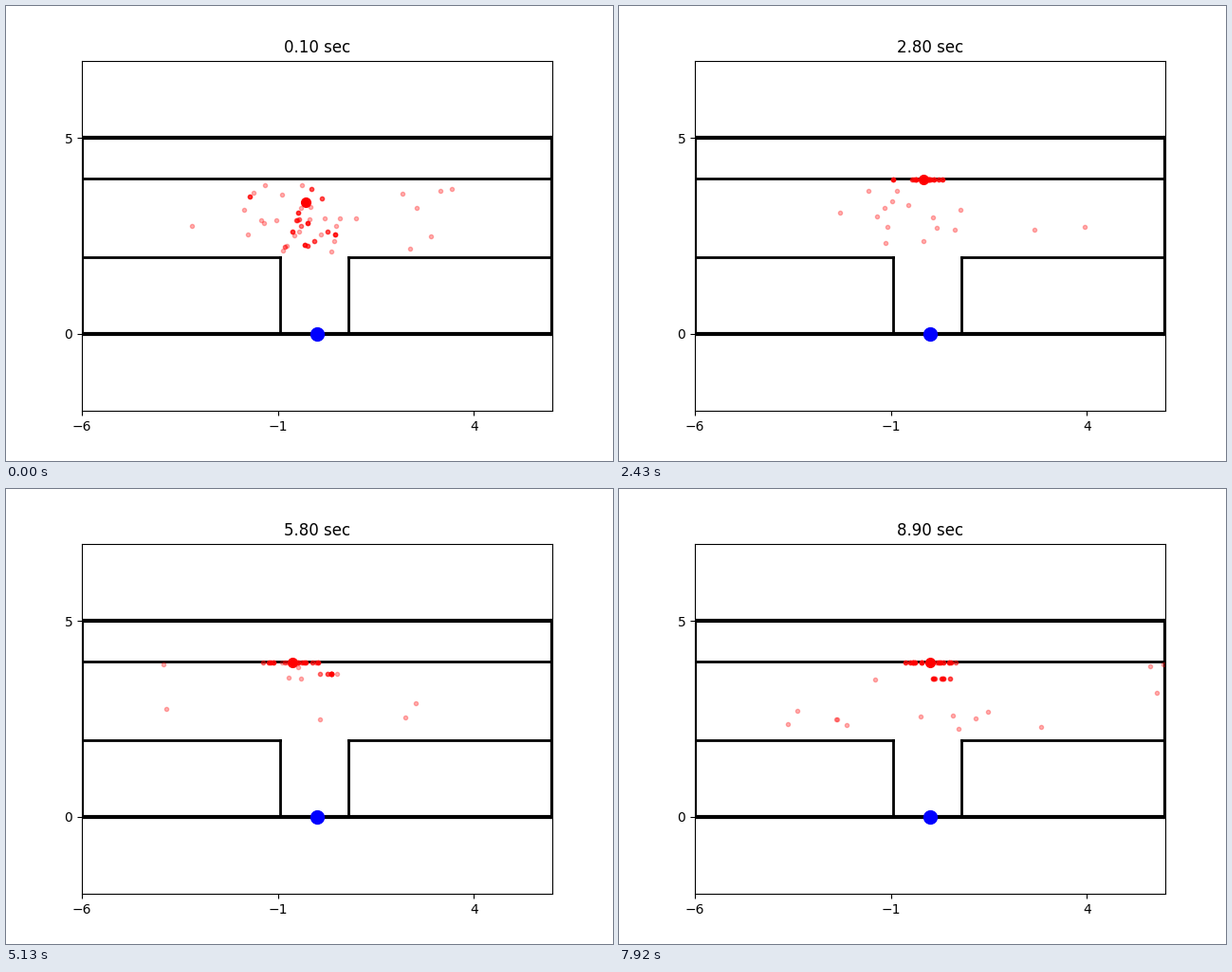
These frames come from a looping animation (640 px wide and 480 px high, 8 s). A matplotlib script:

```python
import numpy as np
import matplotlib.pyplot as plt
from matplotlib.animation import FuncAnimation

FRAMES = 89
LOOP_MS = 8000
FLOOR_Y, WALL_Y = 2.1, 3.94   # particles pile up against the upper wall
CLIMB = 0.17                  # upward drift per step
PILE = 22                     # distinct positions in the main pile
GROUP_GAP = 10.6              # steps between births of climbing groups

steps = np.arange(FRAMES)
key_steps = [0, 19, 35, 45, 57, 76, 88]
est_x = np.interp(steps, key_steps, [-.29, -.17, -.21, -.14, -.63, -.04, 0])
strays = np.interp(steps, key_steps, [24, 16, 17, 11, 8, 10, 15])
spread = .4 + .35 * np.exp(-steps / 4)

base = np.random.default_rng(12)

# The estimate wanders a little between its key points.
walk = np.cumsum(base.normal(0, .05, FRAMES))
est_x += walk - np.interp(steps, key_steps, walk[key_steps])

# Pile offsets change gradually from step to step.
offsets = base.normal(size=(FRAMES, PILE))
for k in range(1, FRAMES):
    offsets[k] = .8 * offsets[k - 1] + .6 * offsets[k]
offsets = offsets.clip(-1.9, 1.9)
start_y = base.uniform(FLOOR_Y, WALL_Y, PILE)


def particles(i):
    rng = np.random.default_rng(500 + i)

    # Lone strays, denser near the doorway
    n = round(strays[i])
    parts = [np.column_stack([rng.triangular(-6.3, 0, 6.3, n),
                              rng.uniform(2, 3.9, n)])]

    # Main pile, which rises to the wall during the first steps
    pile = np.column_stack([est_x[i] + spread[i] * offsets[i],
                            np.minimum(WALL_Y, start_y + CLIMB * i)])
    parts.append(np.repeat(pile, rng.integers(1, 6, PILE), axis=0))

    # Groups of equal height that climb until they reach the wall
    for birth in np.arange(7.8, FRAMES, GROUP_GAP):
        age = i - birth
        y = 2.5 + CLIMB * age
        if age > 0 and y < WALL_Y:
            size = 2 + int(age)
            group = np.column_stack([rng.normal(.22, .2, size),
                                     np.full(size, y)])
            parts.append(np.repeat(group, rng.integers(1, 5, size), axis=0))
    return np.vstack(parts)


fig, ax = plt.subplots(figsize=(6.4, 4.8), dpi=100)
half = 6 * 369.6 / 496
ax.set(xlim=(-6, 6), ylim=(2.5 - half, 2.5 + half),
       xticks=[-6, -1, 4], yticks=[0, 5])
title = ax.set_title("")

# Room outline, then the corridor with its doorway
for y in (0, 5):
    ax.plot([-6, 6], [y, y], "k", lw=3)
for x in (-6, 6):
    ax.plot([x, x], [0, 5], "k", lw=3)
ax.plot([-6, 6], [3.95, 3.95], "k", lw=2)
for door, end in ((-.95, -6), (.8, 6)):
    ax.plot([end, door], [1.95, 1.95], "k", lw=2)
    ax.plot([door, door], [0, 1.95], "k", lw=2)

ax.plot(0, 0, "bo", ms=10)
cloud, = ax.plot([], [], "r.", alpha=.3)
estimate, = ax.plot([], [], "ro", ms=7)


def draw(i):
    title.set_text(f"{(i + 1) / 10:.2f} sec")
    cloud.set_data(*particles(i).T)
    estimate.set_data([est_x[i]], [min(WALL_Y, 3.36 + CLIMB * i)])
    return title, cloud, estimate


anim = FuncAnimation(fig, draw, frames=FRAMES, interval=LOOP_MS / FRAMES,
                     init_func=lambda: draw(0), repeat=True, repeat_delay=0)
plt.show()
```
